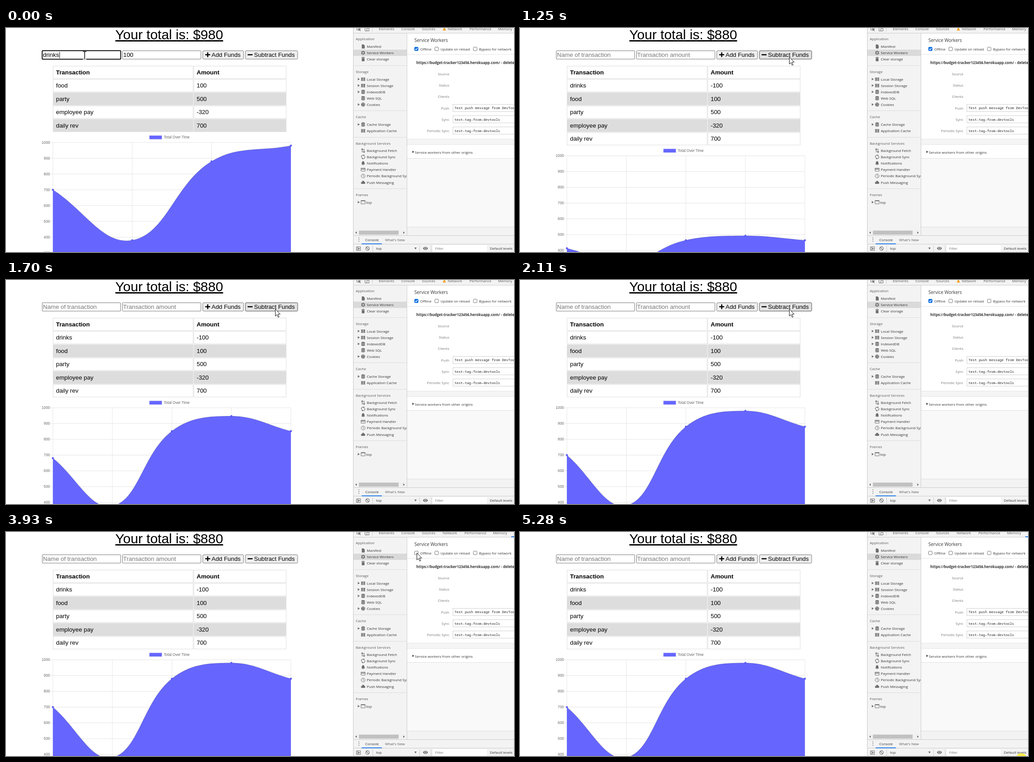
Animation, 1127 px wide and 497 px high, one loop 5380 ms. Source, as an HTML page:

```html
<!DOCTYPE html>
<html lang="en">
<head>
<meta charset="utf-8">
<title>Budget tracker</title>
<style>
html, body { margin: 0; width: 100%; height: 100%; overflow: hidden; background: #fff; }
svg { display: block; width: 1127px; height: 497px; }
text { font: 8px "Open Sans", "Noto Sans", sans-serif; fill: #333; white-space: pre; }
.page text { font: 13.333px "Liberation Sans", Arial, sans-serif; fill: #000; }
.page .title { font-size: 30px; text-decoration: underline; }
.page .bold, .bold { font-weight: bold; }
.page .hint { fill: #757575; }
.page .tick { font-size: 8.2px; fill: #666; }
.end { text-anchor: end; }
.head { fill: #5a5a5a; }
.label { fill: #777; }
.h1 { font-size: 10px; }
.mono { font: 7.65px "Noto Sans Mono", "DejaVu Sans Mono", monospace; fill: #222; }
.hidden { display: none; }
#ibeam { mix-blend-mode: difference; }
</style>
</head>
<body>
<svg viewBox="0 0 1127 497">
  <rect width="1127" height="497" fill="#fff"/>
  <g class="page">
    <g id="form"></g>
    <g id="table"></g>
    <g id="chart"></g>
  </g>
  <g id="tools"></g>
  <circle id="glow" r="13" fill="#fe0" opacity=".7"/>
  <path id="ibeam" d="M-4 -8.5H-1L0 -7.5L1 -8.5H4M0 -7.5V8M-4 8.8H-1L0 8L1 8.8H4" fill="none" stroke="#fff" stroke-width="1.5"/>
  <path id="arrow" d="M.5 .5V16L4 12.7L6.7 18.6L9 17.6L6.4 11.8H11.3Z" fill="#fff" stroke="#111"/>
</svg>
<script>
const LOOP = 5380;
const SUBMIT = 1180, GROW_START = 1170, GROW_TIME = 1000;
const ONLINE = 3880;
const ROW = 29.5;

const $ = id => document.getElementById(id);
const text = (x, y, s, cls = '') => `<text x="${x}" y="${y}" class="${cls}">${s}</text>`;
const rect = (x, y, w, h, fill, more = '') =>
  `<rect x="${x}" y="${y}" width="${w}" height="${h}" fill="${fill}" ${more}/>`;
const path = (d, fill = 'none', stroke = 'none', width = 1) =>
  `<path d="${d}" fill="${fill}" stroke="${stroke}" stroke-width="${width}"/>`;
const hline = (x1, x2, y, color) => path(`M${x1} ${y + .5}H${x2}`, 'none', color);
const vline = (x, y1, y2, color) => path(`M${x + .5} ${y1}V${y2}`, 'none', color);

/* Budget page */
function button(x, w, hover) {
  return rect(x + .5, 50.5, w - 1, 18.5, hover ? '#e3e3e3' : '#efefef',
    `rx="1.8" stroke="${hover ? '#444' : '#767676'}"`);
}

function form({ done, focus, caret, hover }) {
  const field = x => rect(x + .5, 50.5, 174, 18.5, '#fff', 'stroke="#767676" rx=".8"');
  return text(242.6, 25, `Your total is: $${done ? 880 : 980}`, 'title')
    + field(80) + field(258)
    + (focus ? rect(80.3, 50.3, 174.2, 19, '#fff', 'stroke="#101010" stroke-width="2" rx="1.5"') : '')
    + (done ? text(82, 64, 'Name of transaction', 'hint') + text(259.8, 64, 'Transaction amount', 'hint')
            : text(82, 64, 'drinks') + text(260.3, 64, '100'))
    + (caret ? vline(118.5, 53, 67, '#000') : '')
    + button(436, 91.5) + path('M442 59.3H453M447.5 54V64.6', 'none', '#000', 2.5)
    + text(456, 64, 'Add Funds')
    + button(530.7, 116.8, hover) + path('M536 59.3H547', 'none', '#000', 2.5)
    + text(550.3, 64, 'Subtract Funds');
}

function table(done) {
  const rows = [['food', 100], ['party', 500], ['employee pay', -320], ['daily rev', 700]];
  if (done) rows.unshift(['drinks', -100]);
  return [['Transaction', 'Amount'], ...rows].map(([name, amount], i) => {
    const y = 84 + ROW * i, base = y + 18.5;
    const fill = i && i % 2 === 0 ? '#ddd' : '#fff', cls = i ? '' : 'bold';
    return rect(104.5, y + .5, 310.5, 27.6, fill, 'stroke="#ddd"')
      + rect(416.8, y + .5, 204.8, 27.6, fill, 'stroke="#ddd"')
      + text(111, base, name, cls) + text(423, base, amount, cls);
  }).join('');
}

const totals = [700, 380, 880, 980];
const LEFT = 104, RIGHT = 632;

// Smooth line with tension 0.4; heights scale from the axis minimum by `grow`.
function chart(done, grow) {
  const values = done ? [...totals, 880] : totals;
  const top = 254 + (done ? ROW : 0), base = top + 245;
  const step = (RIGHT - LEFT) / (values.length - 1);
  const pts = values.map((v, i) => [LEFT + step * i, top + (1000 - v) * .35]);
  const at = ([x, y]) => `${x.toFixed(2)} ${(base + (y - base) * grow).toFixed(2)}`;
  const cap = ([x, y]) => [Math.min(RIGHT, Math.max(LEFT, x)), Math.min(base, Math.max(top, y))];
  const handles = pts.map((p, i) => {
    const a = pts[i - 1] || p, b = pts[i + 1] || p;
    const da = Math.hypot(p[0] - a[0], p[1] - a[1]), db = Math.hypot(b[0] - p[0], b[1] - p[1]);
    const shift = k => cap([p[0] + k * (b[0] - a[0]), p[1] + k * (b[1] - a[1])]);
    return [shift(-.4 * da / (da + db)), shift(.4 * db / (da + db))];
  });
  let d = 'M' + at(pts[0]);
  for (let i = 1; i < pts.length; i++) d += `C${at(handles[i - 1][1])} ${at(handles[i][0])} ${at(pts[i])}`;

  let out = rect(318, top - 15.5, 28, 8.5, '#66f', 'stroke="#dcdcf0" stroke-width=".7"')
    + text(350, top - 9, 'Total Over Time', 'tick');
  for (let i = 0; i < 8; i++) {
    const y = top + 35 * i;
    out += path(`M98.5 ${y}H${RIGHT}`, 'none', '#e5e5e5') + text(97.5, y + 2.8, 1000 - 100 * i, 'tick end');
  }
  for (const [x] of pts) out += path(`M${x} ${top}V${base}`, 'none', '#e5e5e5');
  out += path(`${d}V${base}H${LEFT}Z`, '#66f') + path(d, 'none', 'rgba(0,0,0,.1)', 2);
  for (const p of pts) {
    const [x, y] = at(p).split(' ');
    out += `<circle cx="${x}" cy="${y}" r="2.3" fill="#5c5cf5"/>`;
  }
  return out;
}

/* Developer tools */
const GREY = '#6e6e6e';
const icons = {
  file: path('M-3 -4.5H1L3.5 -2V4.5H-3Z', GREY),
  gear: `<circle r="2.7" fill="none" stroke="${GREY}" stroke-width="1.8"/>`
    + path('M0 -4.7V-3M0 3V4.7M-4.2 -2.4L-2.6 -1.5M2.6 1.5L4.2 2.4M-4.2 2.4L-2.6 1.5M2.6 -1.5L4.2 -2.4', 'none', GREY, 1.7),
  bin: path('M-3 -2.5H3V4.5H-3ZM-4 -4.2H-1.5V-5H1.5V-4.2H4V-3.2H-4Z', GREY),
  grid: path('M-4.5 -3.5H-.4V-1.3H-4.5ZM.4 -3.5H4.5V-1.3H.4ZM-4.5 -.8H-.4V1.3H-4.5ZM.4 -.8H4.5V1.3H.4ZM-4.5 1.8H-.4V3.8H-4.5ZM.4 1.8H4.5V3.8H.4Z', GREY),
  db: path('M-4 -3C-4 -5 4 -5 4 -3V3C4 5 -4 5 -4 3Z', GREY)
    + path('M-4 -2C-3 -.6 3 -.6 4 -2M-4 1C-3 2.4 3 2.4 4 1', 'none', '#f3f3f3', .8),
  cookie: `<circle r="4.4" fill="${GREY}"/>` + path('M-2 -1.5h1.4M1 -2h1.4M-1.5 2h1.4M1.3 1h1.4', 'none', '#f3f3f3', 1.4),
  fetch: path('M-2 4V-4M-4 -2L-2 -4.3L0 -2M2 -4V4M0 2L2 4.3L4 2', 'none', GREY, 1.2),
  sync: path('M-3.4 1.5A3.6 3.6 0 0 1 1.5 -3.4M3.4 -1.5A3.6 3.6 0 0 1 -1.5 3.4', 'none', GREY, 1.2)
    + path('M.8 -5.5L3.5 -3.2L.8 -1.2ZM-.8 5.5L-3.5 3.2L-.8 1.2Z', GREY),
  bell: path('M-4 3L-3 2V-1C-3 -3.2 -1 -4 0 -5C1 -4 3 -3.2 3 -1V2L4 3ZM-1 3.8H1L0 5Z', GREY),
  card: path('M-4.5 -3.3H4.5V3.3H-4.5Z', 'none', GREY) + path('M-4.5 -1.2H4.5', 'none', GREY, 1.6),
  clock: `<circle r="4.3" fill="none" stroke="${GREY}"/>` + path('M0 -2.7V.3L2 1.5', 'none', GREY),
  cloud: path('M-3 3.3C-5.5 3.3 -5.5 -.5 -2.8 -.7C-2 -4.5 2.6 -4 2.8 -.9C5.4 -.8 5.4 3.3 3 3.3Z', GREY),
  frame: path('M-4.5 -3.7H4.5V3.7H-4.5Z', 'none', GREY) + path('M-4.5 -3H4.5', 'none', GREY, 1.6),
};

// Heading y, its rows, and the gap lines between sections.
const sections = [
  ['Application', 24, ['file|Manifest|41', 'gear|Service Workers|55', 'bin|Clear storage|69.3']],
  ['Storage', 97, ['grid|Local Storage|113.5|1', 'grid|Session Storage|127.6|1', 'db|IndexedDB|141.7|1', 'db|Web SQL|155.7', 'cookie|Cookies|169.8|1']],
  ['Cache', 197, ['db|Cache Storage|214|1', 'grid|Application Cache|228']],
  ['Background Services', 255.5, ['fetch|Background Fetch|272', 'sync|Background Sync|286', 'bell|Notifications|300', 'card|Payment Handler|314.3', 'clock|Periodic Background Sync|328.3', 'cloud|Push Messaging|342.5']],
  ['Frames', 370, ['frame|top|386.5|1']],
];

function sidebar() {
  let out = rect(771, 12, 118, 448, '#f3f3f3') + rect(771, 48, 118, 14, '#dadada');
  for (const [title, y, items] of sections) {
    if (y > 30) out += hline(771, 889, Math.round(y) - 14, '#dcdcdc');
    out += text(776, y + 3, title, 'head');
    for (const item of items) {
      const [icon, name, cy, open] = item.split('|');
      out += `<g transform="translate(792.3 ${cy})">${icons[icon]}</g>`
        + text(icon === 'frame' ? 799 : 800.5, +cy + 3, name)
        + (open ? path(`M780.5 ${cy - 2.8}L784.8 ${cy}L780.5 ${+cy + 2.8}Z`, GREY) : '');
    }
  }
  return out + rect(771, 448, 118, 12, '#f1f1f1') + rect(783, 449.5, 88, 9, '#c1c1c1')
    + path('M778 451.5V456.5L775 454ZM881.5 451.5V456.5L884.5 454Z', '#555');
}

function checkbox(x, label, checked) {
  return rect(x + .5, 42.5, 7.8, 7.8, checked ? '#0b6fe0' : '#fff',
      `rx="1.3" stroke="${checked ? '#0b6fe0' : '#767676'}"`)
    + (checked ? path(`M${x + 2} 46.5L${x + 3.8} 48.4L${x + 7} 44.3`, 'none', '#fff', 1.3) : '')
    + text(x + 13, 50, label);
}

function tools(offline) {
  const shift = offline ? 0 : -11.3;
  let out = rect(889, 12, 238, 448, '#fff') + sidebar() + rect(889, 12, 238, 448, '#fff');

  out += rect(771, 0, 356, 11, '#f3f3f3') + hline(771, 1127, 11, '#ccc')
    + path('M778.5 0V4.5H782M786.5 0V1', 'none', GREY) + path('M781.5 0L787.5 3L785 4L787 6.5L786 7.3L784 4.8L782.5 6.5Z', GREY)
    + path('M796.5 0V6.5H801M800.5 1H805.5V6.5H800.5Z', 'none', GREY) + vline(812, 0, 8, '#ccc')
    + text(827, 5, 'Elements', 'head') + text(877, 5, 'Console', 'head') + text(923, 5, 'Sources', 'head')
    + (offline ? path('M972.5 -1.5L976.3 5.5H968.7Z', '#f0a020') : rect(1121, 9.5, 6, 2, '#1a73e8'))
    + text(980 + shift, 5, 'Network', 'head') + text(1028.3 + shift, 5, 'Performance', 'head')
    + text(1091.7 + shift, 5, 'Memory', 'head');

  out += text(906, 31, 'Service Workers', 'h1')
    + checkbox(906, 'Offline', offline) + checkbox(951, 'Update on reload') + checkbox(1036.5, 'Bypass for network')
    + hline(889, 1127, 58, '#e4e4e4')
    + text(910.3, 80, 'https://budget-tracker123456.herokuapp.com/ - deleted', 'bold');
  ['Source', 'Status', 'Clients', 'Push', 'Sync', 'Periodic Sync'].forEach((name, i) => {
    const y = 101.8 + 25.25 * i;
    out += text(983.5, y + 3, name, 'label end');
    if (i > 2) out += rect(991.5, Math.round(y) - 8.5, 150, 16, '#fff', 'stroke="#d0d0d0"')
      + text(995, y + 2.8, i === 3 ? 'Test push message from DevTools.' : 'test-tag-from-devtools', 'mono');
  });
  out += rect(889, 246, 238, 13, '#f5f5f5') + hline(889, 1127, 246, '#e4e4e4') + hline(889, 1127, 258, '#e4e4e4')
    + path('M901.5 272L905.5 274.8L901.5 277.6Z', '#444') + text(907, 278.5, 'Service workers from other origins')
    + rect(889, 290, 238, 151, '#f9f9f9') + hline(889, 1127, 289, '#e0e0e0')
    + rect(889, 441, 238, 19, '#f3f3f3') + hline(889, 1127, 441, '#dcdcdc')
    + vline(889, 12, 460, '#ccc');

  out += rect(771, 460, 356, 37, '#f3f3f3') + hline(771, 1127, 460, '#ccc') + hline(771, 1127, 479, '#ccc')
    + path('M782 465.5h1.7M782 469.5h1.7M782 473.5h1.7', 'none', GREY, 1.7)
    + text(797, 473, 'Console') + text(841, 473, 'What\'s New', 'head') + rect(789, 478, 45, 1.8, '#1a73e8')
    + path('M777.5 485.5H786.5V493.5H777.5ZM780 485.5V493.5', 'none', GREY) + path('M781.5 487L785.5 489.5L781.5 492Z', GREY)
    + `<circle cx="802" cy="489.3" r="4" fill="none" stroke="${GREY}" stroke-width="1.2"/>`
    + path('M799.2 486.5L804.8 492.1', 'none', GREY, 1.2)
    + vline(813, 482, 497, '#ccc') + text(821, 492, 'top') + path('M906 487H911L908.5 491.5Z', GREY)
    + vline(917, 482, 497, '#ccc')
    + path('M925 489C927.5 484.3 933.5 484.3 936 489C933.5 493.7 927.5 493.7 925 489Z', GREY)
    + '<circle cx="930.5" cy="489" r="2.1" fill="#6e6e6e" stroke="#f3f3f3"/>'
    + vline(943, 482, 497, '#ccc') + rect(947, 482, 120, 15, '#fff') + text(952, 492, 'Filter', 'label')
    + text(1073.5, 492, 'Default levels');
  return out + vline(770, 0, 497, '#c4c4c4');
}

/* Timeline */
const track = [
  [0, 174.5, 60.5], [320, 174.5, 60.5], [520, 300, 55], [750, 428, 58], [880, 440, 58], [1030, 597, 64],
  [2850, 597, 64], [3130, 697, 40], [3240, 785, 36], [3370, 872, 42], [3600, 902, 55], [3830, 911, 46],
  [4060, 911, 46], [4180, 874, 48], [4320, 960, 200], [4490, 1101, 460], [4540, 1112, 503],
];
// Each click: start, end, x, y.
const clicks = [[1080, 1180, 597, 64], [3780, 3880, 911, 46], [5280, LOOP, 1112.5, 504]];

function pointer(t) {
  const i = track.findIndex(k => k[0] > t);
  if (i < 0) return track[track.length - 1].slice(1);
  const [t0, x0, y0] = track[i - 1], [t1, x1, y1] = track[i];
  const k = (t - t0) / (t1 - t0);
  return [x0 + (x1 - x0) * k, y0 + (y1 - y0) * k];
}

const drawn = {};
function paint(id, key, make) {
  if (drawn[id] === key) return;
  drawn[id] = key;
  $(id).innerHTML = make();
}

const place = (el, show, x, y) => {
  el.classList.toggle('hidden', !show);
  el.setAttribute('transform', `translate(${x} ${y})`);
};

function draw(t) {
  const done = t >= SUBMIT, focus = t < 1080, offline = t < ONLINE;
  const caret = focus && (t < 140 || t >= 640);
  const hover = done && t < 2900;
  const left = 1 - Math.min(1, (t - GROW_START) / GROW_TIME);
  const grow = done ? 1 - left ** 4 : 1;
  paint('form', [done, focus, caret, hover].join(), () => form({ done, focus, caret, hover }));
  paint('table', done, () => table(done));
  paint('chart', done + ',' + grow, () => chart(done, grow));
  paint('tools', offline, () => tools(offline));

  const [x, y] = pointer(t);
  place($('ibeam'), t < 880, x, y);
  place($('arrow'), t >= 880 && t < 4540, x, y);
  const click = clicks.find(c => t >= c[0] && t < c[1]);
  place($('glow'), click, click ? click[2] : 0, click ? click[3] : 0);
}

let start;
function tick(now) {
  start ??= now;
  draw((now - start) % LOOP);
  requestAnimationFrame(tick);
}
draw(0);
requestAnimationFrame(tick);
</script>
</body>
</html>
```
